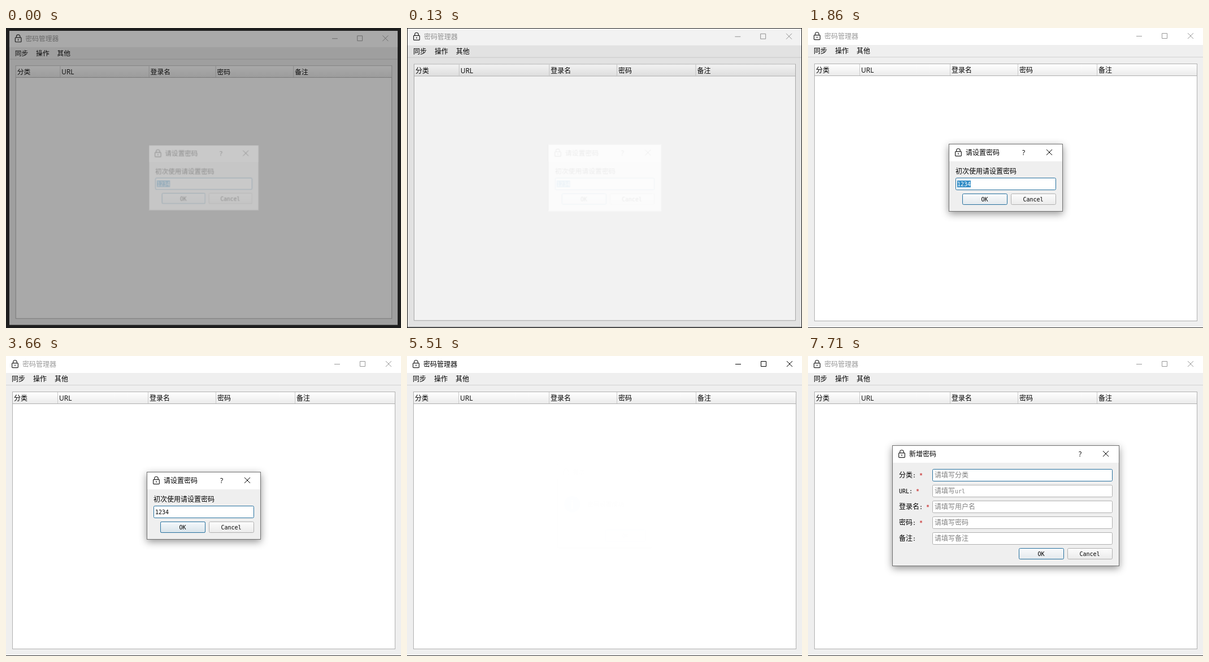
Write an HTML page that moves like this. It is 699x531 px and loops after 8 s.

```html
<!DOCTYPE html>
<html lang="zh-CN">
<head>
<meta charset="utf-8">
<title>密码管理器</title>
<style>
html, body { margin: 0; width: 100%; height: 100%; overflow: hidden; background: #1e1e1e; }
svg { display: block; width: 699px; height: 531px; }
text { font: 12px "Open Sans", "Noto Sans CJK SC", "Noto Sans CJK", sans-serif; white-space: pre; }
.form, .form tspan { font-family: "DejaVu Sans Mono", "Noto Sans CJK SC", "Noto Sans CJK", monospace; }
.form .latin { font-size: 10px; }
.frame { filter: drop-shadow(0 4px 7px rgba(0, 0, 0, .42)); }
</style>
</head>
<body>
<svg id="stage" viewBox="0 0 699 531">
  <defs>
    <linearGradient id="head" x2="0" y2="1"><stop stop-color="#fff"/><stop offset="1" stop-color="#ebebeb"/></linearGradient>
    <linearGradient id="plain" x2="0" y2="1"><stop stop-color="#fcfcfc"/><stop offset="1" stop-color="#ebebeb"/></linearGradient>
    <linearGradient id="default" x2="0" y2="1"><stop stop-color="#fafbfc"/><stop offset="1" stop-color="#e3e9ed"/></linearGradient>
    <linearGradient id="hovered" x2="0" y2="1"><stop stop-color="#f5f9fc"/><stop offset="1" stop-color="#d8e3ea"/></linearGradient>
  </defs>
</svg>
<script>
const DURATION = 8000;
const BLUE = '#308cc6', FOCUS = '#26709e', EDGE = '#b0b0b0', BODY = '#efefef';

const rect = (x, y, w, h, fill, extra = '') =>
  `<rect x="${x}" y="${y}" width="${w}" height="${h}" fill="${fill}" ${extra}/>`;
const box = (x, y, w, h, fill, stroke, extra = '') =>
  rect(x + .5, y + .5, w - 1, h - 1, fill, `stroke="${stroke}" ${extra}`);
const text = (x, y, s, fill = '#000', extra = '') =>
  `<text x="${x}" y="${y}" fill="${fill}" ${extra}>${s}</text>`;
// Form text: half-width Latin beside full-width Chinese.
const form = (x, y, s, fill = '#000', extra = '') =>
  text(x, y, s.replace(/[ -~]+/g, m => `<tspan class="latin">${m}</tspan>`), fill, `class="form" ${extra}`);
const line = (d, stroke = 'currentColor') => `<path d="${d}" fill="none" stroke="${stroke}"/>`;
const group = (id, ...parts) => `<g id="${id}">${parts.join('')}</g>`;

const lock = (x, y) => `<g transform="translate(${x} ${y})" fill="none" stroke="#222" stroke-width="1.2">
  <rect x="10.6" y="12.6" width="10.8" height="8" rx="1"/>
  <path d="M12.7 12.5V10.8a3.3 3.3 0 0 1 6.6 0V12.5M16 15.2V18"/></g>`;
const cross = (x, y, stroke) => line(`M${x} ${y}l10 10m0-10l-10 10`, stroke);
const input = (x, y, w, focused) => box(x, y, w, 22, '#fff', focused ? FOCUS : EDGE, 'rx="2"');
const button = (x, y, label, main, h = 20) =>
  box(x, y, 80, h, main ? 'url(#default)' : 'url(#plain)', main ? FOCUS : EDGE, 'rx="2"') + caption(x, y, label, h);
const caption = (x, y, label, h = 20) => form(x + 39.5, y + h / 2 + 4, label, '#000', 'text-anchor="middle"');
const hover = (id, x, y, h = 20) =>
  group(id, box(x, y, 80, h, 'url(#hovered)', FOCUS, 'rx="2"'), caption(x, y, 'OK', h));

function dialog(id, x, y, w, h, title, help, ...content) {
  return group(id,
    box(x, y, w, h, BODY, '#707070', `class="frame" id="${id}Frame"`),
    rect(x + 1, y + 1, w - 2, 30, '#fff'),
    lock(x + 1, y + 1),
    text(x + 30, y + 20, title),
    help ? text(x + w - 72, y + 20, '?', '#000', 'font-weight="600"') : '',
    cross(x + w - 29, y + 10, '#000'),
    ...content);
}

const columns = [[11, '分类'], [91, 'URL'], [251, '登录名'], [371, '密码'], [511, '备注']];
const mainWindow = group('main',
  rect(0, 0, 699, 531, BODY),
  rect(0, 0, 699, 30, '#fff'),
  lock(0, 0),
  group('chrome',
    text(29, 19, '密码管理器', 'currentColor'),
    line('M581 14.5h10M626.5 9.5h9v9h-9z'),
    cross(672, 9)),
  ['同步', '操作', '其他'].map((s, i) => text(10 + 38 * i, 45, s)).join(''),
  line('M0 51.5H699', '#d2d2d2'),
  box(11, 63, 678, 456, '#fff', EDGE),
  rect(12, 64, 676, 20, 'url(#head)'),
  line('M12 84.5H688', EDGE),
  columns.map(([x, s], i) => (i ? line(`M${x + .5} 64V84`, '#cacaca') : '') + text(x + 3, 79, s)).join(''),
  rect(0, 530, 699, 1, '#3a3a3a'));

const setup = dialog('setup', 249, 205, 202, 120, '请设置密码', true,
  form(261, 258, '初次使用请设置密码'),
  input(261, 265, 178, true),
  form(264, 280, '1234'),
  group('selection', rect(264, 270, 24, 12, BLUE), form(264, 280, '1234', '#fff')),
  group('caret', rect(288, 270, 1, 12, '#000')),
  button(273, 293, 'OK', true), hover('setupHover', 273, 293),
  button(359, 293, 'Cancel'));

const notice = dialog('notice', 257, 183, 186, 165, '提示', false,
  '<circle cx="286" cy="262" r="16" fill="#1a78d0"/>',
  rect(284.5, 253, 3, 3, '#fff'), rect(284.5, 258, 3, 13, '#fff'),
  form(316, 266, '密码设置成功'),
  button(351, 312, 'OK', true, 24), hover('noticeHover', 351, 312, 24));

const menu = group('menu',
  rect(44, 30, 38, 21, BLUE), text(48, 45, '操作', '#fff'),
  box(44, 51, 124, 29, '#fff', '#a0a0a0'),
  text(70, 70, '新增密码'),
  group('menuHover', rect(46, 53, 120, 25, BLUE), text(70, 70, '新增密码', '#fff')));

const fields = [['分类:', '请填写分类', 1], ['URL:', '请填写url', 1], ['登录名:', '请填写用户名', 1],
  ['密码:', '请填写密码', 1], ['备注:', '请填写备注', 0]];
const entry = dialog('entry', 149, 158, 402, 214, '新增密码', true,
  fields.map(([label, hint, required], i) => {
    const y = 200 + 28 * i;
    const star = required ? '<tspan class="latin" fill="#c00000"> *</tspan>' : '';
    return form(161, y + 15, label).replace('</text>', star + '</text>') +
      input(220, y, 319, i === 0) + form(224, y + 15, hint, '#808080');
  }).join(''),
  group('entryCaret', rect(224, 206, 1, 11, '#000')),
  button(373, 340, 'OK', true), button(459, 340, 'Cancel'));

const veil = group('veil', rect(249, 205, 202, 120, '#fff'));
document.getElementById('stage').insertAdjacentHTML('beforeend',
  mainWindow + veil + menu + setup + notice + entry);

// Each step holds its value until the next one; all clocks start with the first painted frame.
function play(id, steps, toStyle) {
  const frames = steps.map(([ms, ...v]) => ({ offset: ms / DURATION, easing: 'step-end', ...toStyle(...v) }));
  frames.push({ ...frames[frames.length - 1], offset: 1 });
  document.getElementById(id).animate(frames, { duration: DURATION, iterations: Infinity });
}
function fade(id, steps, origin = '350px 265px') {
  document.getElementById(id).style.transformOrigin = origin;
  play(id, steps, (opacity, scale = 1) => ({ opacity, transform: `scale(${scale})` }));
}
const opening = (from, to) => [[.25, .93], [.62, .965], [.85, .985], [.95, .995], [1, 1]]
  .map((v, i) => [from + (to - from) * i / 4, ...v]);

fade('main', [[0, .62, .983], [70, .83, .992], [130, .947, .997], [200, .99, .999], [260, 0], [1860, 1]], '349.5px 265px');
fade('veil', [[0, .2, .965], [70, .5, .98], [130, .78, .99], [200, .9, .997], [260, 0]], '349.3px 264.3px');
fade('setup', [[0, .23, .965], [70, .15, .98], [130, .07, .99], [200, .02, .997], [260, 0], [1860, 1],
  [4190, .75, .98], [4257, .35, .95], [4323, .06, .92], [4390, 0]]);
play('setupFrame', [[0, 'none'], [1860, 'drop-shadow(0 4px 7px rgba(0, 0, 0, .42))']], filter => ({ filter }));
fade('selection', [[0, 1], [3460, 0]]);
fade('caret', [[0, 0], [2120, 1], [2650, 0], [3130, 1], [3660, 0]]);
fade('setupHover', [[0, 0], [2320, 1]]);
fade('notice', [[0, 0], ...opening(4323, 4590), [5320, .75, .98], [5383, .38, .95], [5447, .1, .92], [5510, .008, .9], [7100, 0]]);
fade('noticeHover', [[0, 0], [4920, 1]]);
fade('menu', [[0, 0], [6700, .4], [6770, .8], [6840, 1], [7100, .4], [7168, 0]]);
fade('menuHover', [[0, 0], [6840, 1]]);
fade('entry', [[0, 0], ...opening(7168, 7440)]);
fade('entryCaret', [[0, 1], [7710, 0]]);
play('chrome', [[0, '#999'], [4190, '#000'], [4323, '#999'], [5320, '#000'], [7168, '#999']], color => ({ color }));
</script>
</body>
</html>
```
